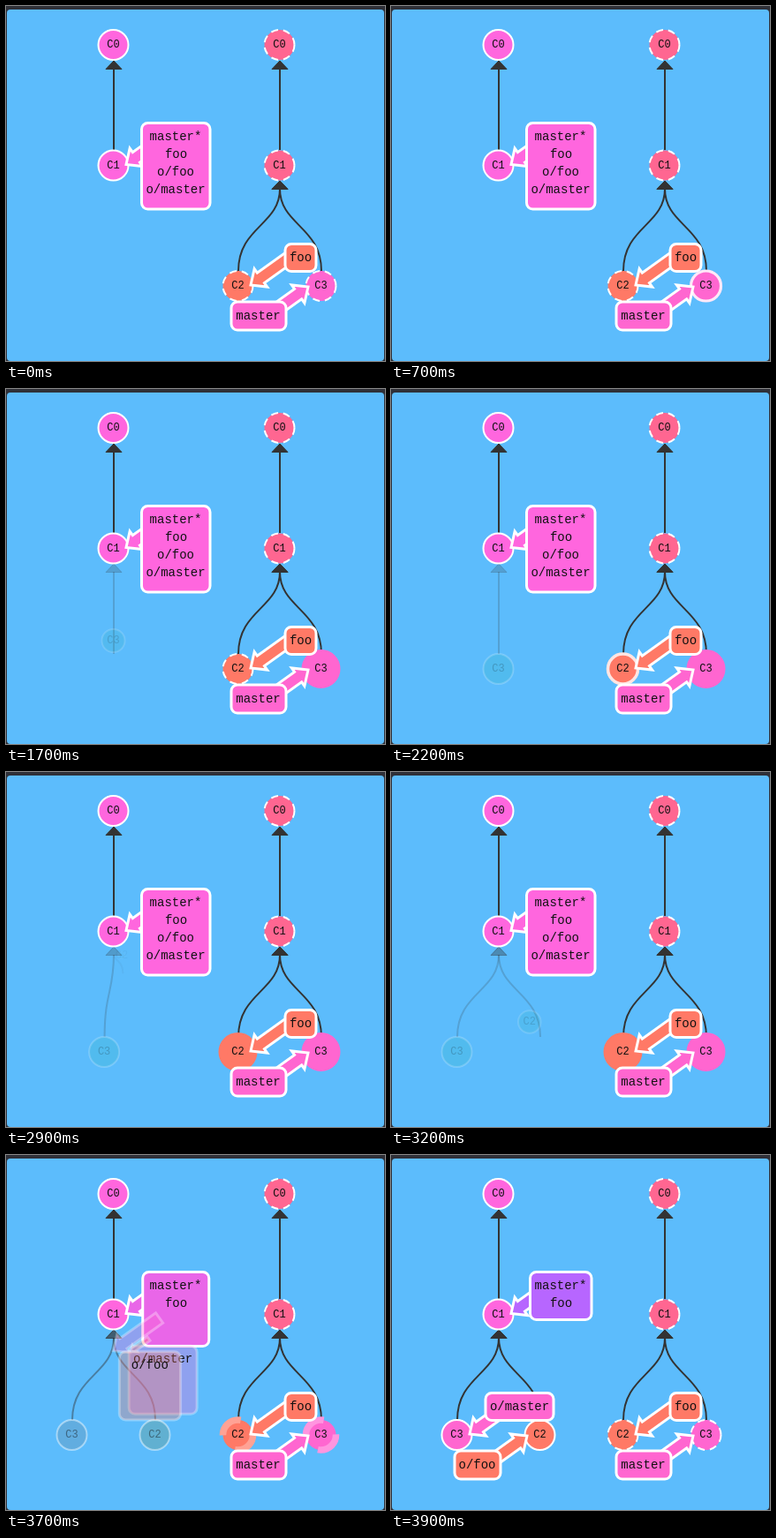
These frames come from a looping animation (429 by 402 pixels, 5.8 s). An HTML page with a canvas:

```html
<!DOCTYPE html>
<html lang="en">
<head>
<meta charset="utf-8">
<title>Fetching commits</title>
<style>
html, body { margin: 0; height: 100%; overflow: hidden; background: #2f3038; }
canvas { display: block; }
</style>
</head>
<body>
<canvas id="stage" width="429" height="402"></canvas>
<script>
const ctx = document.getElementById('stage').getContext('2d');
const LOOP = 5800, STEP = 100;
const WHITE = [255, 255, 255], PINK = [255, 102, 222], ROSE = [255, 102, 145],
  MAGENTA = [255, 102, 208], CORAL = [255, 121, 102], PURPLE = [183, 102, 255],
  TEAL = [36, 179, 179];
const RADIUS = 17, LINE = 2, FAINT = 0.2;
const LEFT = 121.5, RIGHT = 309.5, SPREAD = 47, ROW = [44, 180.5, 317];

const lerp = (a, b, p) => a + (b - a) * p;
const mix = (a, b, p) => a.map((v, i) => lerp(v, b[i], p));
const rgb = c => `rgb(${c.map(Math.round).join()})`;
const progress = (t, start, length) => Math.min(1, Math.max(0, (t - start) / length));

function easeInOut(n) {
  const q = 0.48 - n / 1.04, r = Math.sqrt(0.1734 + q * q);
  const u = Math.cbrt(r - q) + Math.cbrt(-r - q) + 0.5;
  return n <= 0 ? 0 : n >= 1 ? 1 : 3 * (1 - u) * u * u + u ** 3;
}

function bounce(n) {
  const s = 7.5625, d = 2.75;
  if (n < 1 / d) return s * n * n;
  if (n < 2 / d) return s * (n - 1.5 / d) ** 2 + 0.75;
  if (n < 2.5 / d) return s * (n - 2.25 / d) ** 2 + 0.9375;
  return s * (n - 2.625 / d) ** 2 + 0.984375;
}

function write(text, x, y, size, alpha = 1) {
  ctx.globalAlpha = alpha;
  ctx.font = `${size}px "Liberation Mono", "Courier New", monospace`;
  ctx.fillStyle = '#111';
  ctx.fillText(text, x, y);
  ctx.globalAlpha = 1;
}

// A curve from a child up to the arrowhead below its parent.
function edge(x, top, childX, bottom, alpha = 1) {
  const bend = Math.min(50, (bottom - top) / 2);
  ctx.globalAlpha = alpha;
  ctx.strokeStyle = ctx.fillStyle = '#333';
  ctx.lineWidth = 2;
  ctx.beginPath();
  ctx.moveTo(childX, bottom);
  ctx.bezierCurveTo(childX, bottom - bend, x, top + bend, x, Math.min(top + 9, bottom));
  ctx.stroke();
  ctx.lineWidth = 1;
  ctx.beginPath();
  ctx.moveTo(x, top);
  ctx.lineTo(x + 9, top + 9.5);
  ctx.lineTo(x - 9, top + 9.5);
  ctx.closePath();
  ctx.fill();
  ctx.stroke();
  ctx.globalAlpha = 1;
}

function node(name, x, y, fill, { alpha = 1, scale = 1, width = LINE, stroke = WHITE, dashed = false } = {}) {
  ctx.globalAlpha = alpha;
  ctx.beginPath();
  ctx.arc(x, y, RADIUS * scale, 0, 2 * Math.PI);
  ctx.fillStyle = rgb(fill);
  ctx.fill();
  ctx.setLineDash(dashed ? [4 * width, 3 * width] : []);
  ctx.strokeStyle = rgb(stroke);
  ctx.lineWidth = width;
  ctx.stroke();
  ctx.setLineDash([]);
  write(name, x, y, 12, alpha);
}

// Arrow outline beside a commit; side is 1 for right, -1 for left.
function arrowPoints(x, y, side) {
  const angle = -0.62, cos = Math.cos(angle), sin = Math.sin(angle);
  const outline = [[0, 0], [14, -12.5], [14, -7], [64, -7], [64, 7], [14, 7], [14, 12.5]];
  return outline.map(([a, b]) => [
    x + side * (14.5 + a * cos - b * sin),
    y + side * (-1 + a * sin + b * cos)
  ]);
}

function tag(points, box, fill, alpha = 1) {
  ctx.globalAlpha = alpha;
  ctx.fillStyle = rgb(fill);
  ctx.strokeStyle = '#fff';
  ctx.lineWidth = 3;
  ctx.beginPath();
  points.forEach(p => ctx.lineTo(...p));
  ctx.closePath();
  ctx.fill();
  ctx.stroke();
  ctx.beginPath();
  ctx.roundRect(...box, 7);
  ctx.fill();
  ctx.stroke();
  ctx.globalAlpha = 1;
}

// A label that leaves the stack beside C1 and settles beside its own commit.
function movingTag(text, stackY, x, side, box, fill, p) {
  const stackBox = [153.5, stackY - 15.5, 77, 97.5];
  const textY = side > 0 ? 285 : 351;
  if (p > 0) {
    const from = arrowPoints(LEFT, ROW[1], 1), to = arrowPoints(x, ROW[2], side);
    tag(from.map((point, i) => mix(point, to[i], p)), mix(stackBox, box, p), fill, p);
  }
  write(text, lerp(192, x + side * 71, p), lerp(stackY, textY, p), 14);
}

function remoteNode(name, x, fill, grow, shrink) {
  const p = grow * (1 - shrink);
  node(name, x, ROW[2], fill, {
    width: lerp(LINE, LINE * 5, p),
    stroke: mix(WHITE, fill, p),
    dashed: grow === 0 || shrink > 0
  });
}

function draw(t) {
  const settle = easeInOut(progress(t, 3575, 325));
  const glowC3 = easeInOut(progress(t, 585, 430));
  const glowC2 = easeInOut(progress(t, 2070, 430));
  const shift = easeInOut(progress(t, 2770, 400));

  ctx.fillStyle = '#2f3038';
  ctx.fillRect(0, 0, 429, 402);
  ctx.fillStyle = '#5cbcfc';
  ctx.beginPath();
  ctx.roundRect(1, 4, 427, 398, 4);
  ctx.fill();

  for (const x of [LEFT, RIGHT]) edge(x + 0.5, 62, x + 0.5, 163);
  for (const side of [-1, 1]) edge(RIGHT + 0.5, 198, RIGHT + 0.5 + side * SPREAD, 300);

  const alpha = lerp(FAINT, 1, settle);
  const newCommits = [
    { name: 'C3', start: 1300, x: LEFT - SPREAD * shift, fill: MAGENTA },
    { name: 'C2', start: 2770, x: LEFT + SPREAD, fill: CORAL }
  ].filter(c => t > c.start);
  for (const c of newCommits) {
    const p = easeInOut(progress(t, c.start, 400));
    edge(LEFT + 0.5, 198, lerp(LEFT, c.x, p) + 0.5, lerp(208, 300, p), alpha * p);
  }
  for (const c of newCommits) {
    const p = bounce(progress(t, c.start, 800));
    node(c.name, lerp(LEFT, c.x, p), lerp(ROW[1], ROW[2], p), mix(TEAL, c.fill, settle),
      { alpha: alpha * p, scale: p });
  }

  for (const i of [0, 1]) {
    node('C' + i, LEFT, ROW[i], PINK);
    node('C' + i, RIGHT, ROW[i], ROSE, { dashed: true });
  }
  remoteNode('C2', RIGHT - SPREAD, CORAL, glowC2, settle);
  remoteNode('C3', RIGHT + SPREAD, MAGENTA, glowC3, settle);

  tag(arrowPoints(RIGHT - SPREAD, ROW[2], 1), [316, 269.5, 35, 31], CORAL);
  write('foo', 333.5, 285, 14);
  tag(arrowPoints(RIGHT + SPREAD, ROW[2], -1), [255, 335, 62, 32], MAGENTA);
  write('master', 285.5, 351, 14);

  tag(arrowPoints(LEFT, ROW[1], 1),
    mix([153.5, 132.5, 77.5, 97.5], [157.5, 132.5, 69.5, 54], settle), mix(PINK, PURPLE, settle));
  write('master*', 192, 148, 14);
  write('foo', 192.5, 168, 14);
  movingTag('o/master', 208, LEFT - SPREAD, 1, [107, 269.5, 77, 31], MAGENTA, settle);
  movingTag('o/foo', 188, LEFT + SPREAD, -1, [72, 335, 52, 32], CORAL, settle);
}

ctx.textAlign = 'center';
ctx.textBaseline = 'middle';
const begin = performance.now();
function tick() {
  const t = (performance.now() - begin) % LOOP;
  draw(Math.floor(t / STEP) * STEP);
  requestAnimationFrame(tick);
}
tick();
</script>
</body>
</html>
```
